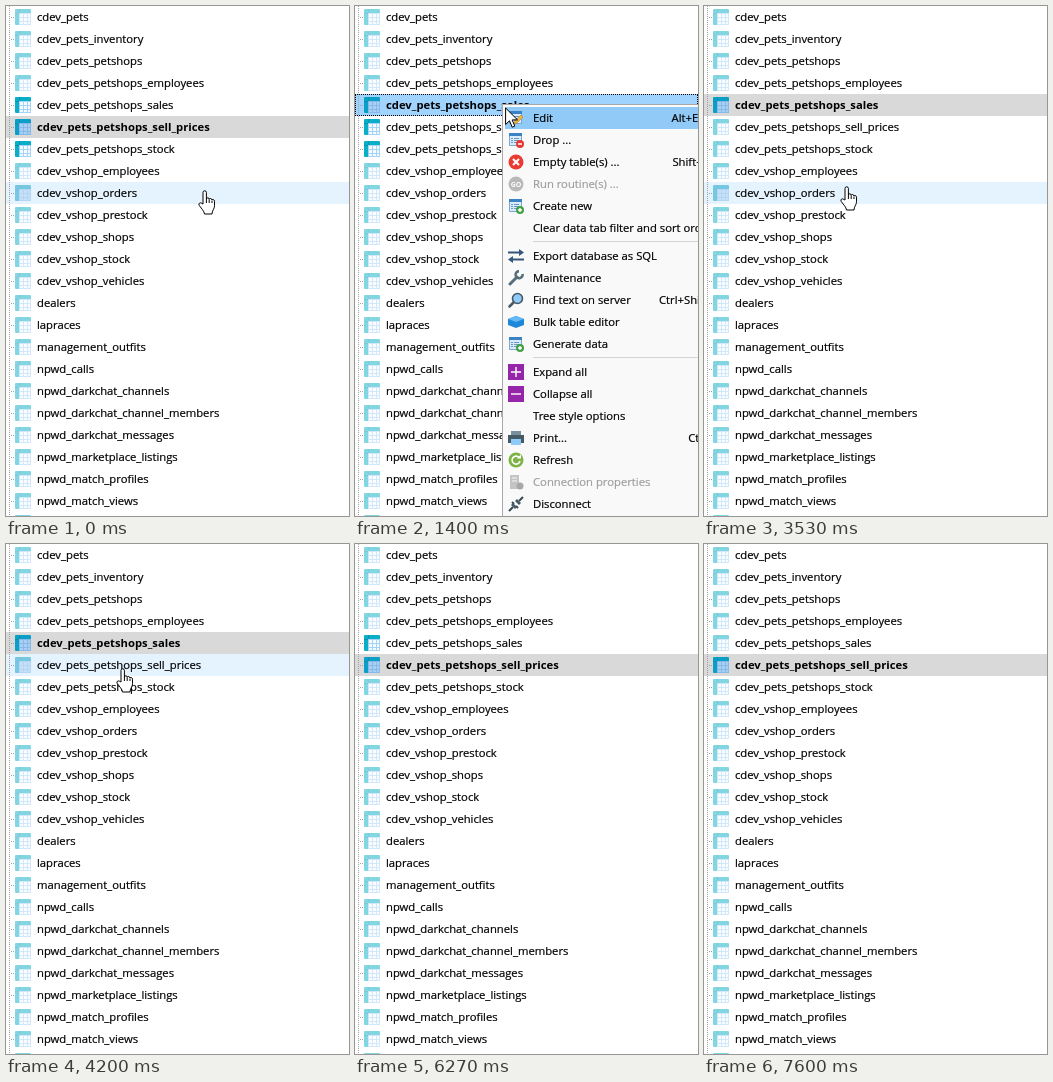
Recreate the animation shown at these times as an HTML page. Size 343 by 510 pixels, loop 8 s.

```html
<!DOCTYPE html>
<html lang="en">
<head>
<meta charset="utf-8">
<title>Table tree</title>
<style>
  html, body { margin: 0; width: 100%; height: 100%; overflow: hidden; background: #fff; }
  body { position: relative; font: 11.27px/22px "Open Sans", "Noto Sans", sans-serif; color: #000; white-space: nowrap; cursor: default; }
  #stage { position: absolute; left: 0; top: 0; width: 343px; height: 510px; overflow: hidden; background: #fff; -webkit-text-stroke: .2px; }
  #tree { position: absolute; left: 0; width: 343px; }
  .row { position: relative; box-sizing: border-box; height: 22px; padding-left: 31px; }
  .row::before { content: ""; position: absolute; left: 3px; top: 0; width: 1px; height: 22px;
    background: repeating-linear-gradient(#a0a0a0 0 1px, transparent 1px 2px); }
  .row::after { content: ""; position: absolute; left: 4px; top: 11px; width: 5px; height: 1px;
    background: repeating-linear-gradient(90deg, transparent 0 1px, #a0a0a0 1px 2px); }
  .row svg { position: absolute; left: 9px; top: 3px; opacity: .5; }
  .row.bright svg { opacity: 1; }
  .row.hot, .row.sel { --cell: #a9cff2; --line: #86b8ea; --head: #0a9fc6; }
  .row.hot { background: #e5f3ff; }
  .row.sel { background: #d9d9d9; font-weight: 700; -webkit-text-stroke: 0; }
  .row.focus { background: #a0d4ff; outline: 1px dotted #000; outline-offset: -1px; }
  .row.focus.hot { background: #cce8ff; }
  #menu { position: absolute; box-sizing: border-box; width: 241px; height: 415px; background: #f9f9f9; border: 1px solid #a8a8a8; }
  .item { position: absolute; left: 2px; right: 1px; height: 22px; }
  .item.hot { background: #91c9f7; }
  .item svg { position: absolute; left: 3px; top: 3px; }
  .item span { position: absolute; left: 28px; }
  .item i { position: absolute; right: 21px; font-style: normal; }
  .item.off { color: #9d9d9d; }
  .sep { position: absolute; left: 30px; right: 0; height: 1px; background: #d4d4d4; }
  #hand, #arrow { position: absolute; left: 0; top: 0; }
</style>
</head>
<body>
<svg width="0" height="0" style="position:absolute">
  <symbol id="table" viewBox="0 0 16 16">
    <rect x="4" y="4" width="12" height="12" style="fill:var(--line,#a3d3f7)"/>
    <path d="M5 5h3v3h-3zM9 5h3v3h-3zM13 5h2v3h-2zM5 9h3v3h-3zM9 9h3v3h-3zM13 9h2v3h-2zM5 13h3v2h-3zM9 13h3v2h-3zM13 13h2v2h-2z" style="fill:var(--cell,#f6fbff)"/>
    <path d="M1 0h14a1 1 0 0 1 1 1v3H4v12H1a1 1 0 0 1-1-1V1a1 1 0 0 1 1-1z" style="fill:var(--head,#08afc6)"/>
    <path d="M0 4.5h4M4.5 0v4" stroke="#0892b0"/>
  </symbol>
  <symbol id="sheet" viewBox="0 0 16 16">
    <path d="M1.5 1.5h12v12h-12z" fill="#d9ebfa" stroke="#7ba7d0"/>
    <path d="M1 1h13v3H1z" fill="#3b82c4"/>
    <path d="M3 6.5h2M6 6.5h5M3 8.5h2M6 8.5h5M3 10.5h2M6 10.5h4" stroke="#6a97c4"/>
  </symbol>
  <symbol id="edit" viewBox="0 0 16 16"><use href="#sheet"/><path d="M6 14l1-3 6-6 2 2-6 6z" fill="#f4b63f" stroke="#b97a18" stroke-width=".6"/></symbol>
  <symbol id="drop" viewBox="0 0 16 16"><use href="#sheet"/><circle cx="12" cy="12" r="4" fill="#e53935"/><path d="M10 12h4" stroke="#fff" stroke-width="1.5"/></symbol>
  <symbol id="add" viewBox="0 0 16 16"><use href="#sheet"/><circle cx="12" cy="12" r="4" fill="#43a047"/><path d="M10 12h4M12 10v4" stroke="#fff" stroke-width="1.4"/></symbol>
  <symbol id="empty" viewBox="0 0 16 16"><circle cx="8" cy="8" r="7.5" fill="#ea3b33"/><path d="M5 5l6 6M11 5l-6 6" stroke="#fff" stroke-width="2"/></symbol>
  <symbol id="go" viewBox="0 0 16 16"><circle cx="8" cy="8" r="7.5" fill="#b9b9b9"/><text x="8" y="10.6" text-anchor="middle" font-size="7" font-weight="700" fill="#fff">GO</text></symbol>
  <symbol id="export" viewBox="0 0 16 16"><path d="M0 4.5h12M4 11.5h12" stroke="#34567a" stroke-width="2"/><path d="M11 1l5 3.5L11 8zM5 8l-5 3.5L5 15z" fill="#34567a"/></symbol>
  <symbol id="wrench" viewBox="0 0 16 16"><path d="M2 14l7-7" stroke="#546e7a" stroke-width="3" stroke-linecap="round"/><path d="M14.5 4A3.5 3.5 0 1 1 11 1.2" fill="none" stroke="#546e7a" stroke-width="2.6"/></symbol>
  <symbol id="find" viewBox="0 0 16 16"><path d="M1.5 14.5l4-4" stroke="#455a64" stroke-width="2.5" stroke-linecap="round"/><circle cx="9.5" cy="6.5" r="5" fill="#90caf9" stroke="#455a64" stroke-width="1.6"/></symbol>
  <symbol id="bulk" viewBox="0 0 16 16"><path d="M0 5l8-3 8 3v6l-8 3-8-3z" fill="#1e88d8"/><path d="M0 5l8-3 8 3-8 3z" fill="#64b8f5"/></symbol>
  <symbol id="plus" viewBox="0 0 16 16"><path d="M0 0h16v16H0z" fill="#9526a9"/><path d="M3 8h10M8 3v10" stroke="#fff" stroke-width="1.4"/></symbol>
  <symbol id="minus" viewBox="0 0 16 16"><path d="M0 0h16v16H0z" fill="#9526a9"/><path d="M3 8h10" stroke="#fff" stroke-width="1.4"/></symbol>
  <symbol id="print" viewBox="0 0 16 16"><path d="M3 1h10v5H3z" fill="#78909c"/><path d="M0 5h16v8H0z" fill="#455a64"/><path d="M3 9h10v6H3z" fill="#90caf9"/></symbol>
  <symbol id="refresh" viewBox="0 0 16 16"><circle cx="8" cy="8" r="7.5" fill="#7cb342"/><path d="M11.5 6A4 4 0 1 0 12 9" fill="none" stroke="#fff" stroke-width="1.6"/><path d="M9 6.5h4v-4z" fill="#fff"/></symbol>
  <symbol id="server" viewBox="0 0 16 16"><path d="M2 1h9v14H2z" fill="#c4c4c4"/><path d="M4 4h5M4 7h5" stroke="#f5f5f5"/><circle cx="12" cy="12" r="3.5" fill="#a8a8a8"/></symbol>
  <symbol id="plug" viewBox="0 0 16 16"><path d="M1 15l4-4M11 5l4-4M6 8l-2-2M10 12l-2-2" stroke="#37474f" stroke-width="2"/><path d="M3 9l4 4 2-2-4-4zM7 5l4 4 2-2-4-4z" fill="#455a64"/></symbol>
</svg>
<div id="stage">
  <div id="tree"></div>
  <div id="menu"></div>
  <svg id="hand" width="18" height="25" viewBox="0 0 18 25">
    <path d="M5 14V2.5a1.7 1.7 0 0 1 3.400 0V9q0-1.300 1.400-1.200T11.200 9.300q.2-1 1.400-.8t1.400 1.500q.3-.8 1.300-.5t1.200 1.700v4.500q0 2-1.200 4t-1.300 4.300H6.500q-.2-2-2-4.300L1.200 15.400q-.9-1.600.4-2.300t2.200.3z" fill="#fff" stroke="#000" stroke-linejoin="round"/>
    <path d="M8.400 9v4M11.200 9.500V13M14 10.500V13" stroke="#000"/>
  </svg>
  <svg id="arrow" width="14" height="22" viewBox="0 0 14 22">
    <path d="M.6 1v16.500l3.900-3.700 2.700 6.400 2.600-1.100-2.700-6.200h5.400z" fill="#fff" stroke="#000"/>
  </svg>
</div>
<script>
const $ = id => document.getElementById(id);
const ROW = 22, LOOP = 8000, TICK = 1000 / 15;

// Rows above the resting view, seen only while the tree scrolls back
const above = `bank_accounts bank_statements bans billing bossmenu cdev_boats cdev_garage cdev_houses
  cdev_items cdev_jobs cdev_keys cdev_lockers cdev_logs cdev_members cdev_orders`.split(/\s+/);
const shown = `cdev_pets cdev_pets_inventory cdev_pets_petshops cdev_pets_petshops_employees
  cdev_pets_petshops_sales cdev_pets_petshops_sell_prices cdev_pets_petshops_stock
  cdev_vshop_employees cdev_vshop_orders cdev_vshop_prestock cdev_vshop_shops cdev_vshop_stock
  cdev_vshop_vehicles dealers lapraces management_outfits npwd_calls npwd_darkchat_channels
  npwd_darkchat_channel_members npwd_darkchat_messages npwd_marketplace_listings
  npwd_match_profiles npwd_match_views npwd_messages`.split(/\s+/);

const icon = id => `<svg width="16" height="16"><use href="#${id}"/></svg>`;
$("tree").innerHTML = above.concat(shown).map(n => `<div class="row">${icon("table")}${n}</div>`).join("");
const rows = [...document.querySelectorAll(".row")];

const entries = [
  ["edit", "Edit", "Alt+Enter"], ["drop", "Drop ..."], ["empty", "Empty table(s) ...", "Shift+Del"],
  ["go", "Run routine(s) ...", "", "off"], ["add", "Create new"], ["", "Clear data tab filter and sort order"], null,
  ["export", "Export database as SQL"], ["wrench", "Maintenance"], ["find", "Find text on server", "Ctrl+Shift+F"],
  ["bulk", "Bulk table editor"], ["add", "Generate data"], null,
  ["plus", "Expand all"], ["minus", "Collapse all"], ["", "Tree style options"], ["print", "Print...", "Ctrl+P"],
  ["refresh", "Refresh", "F5"], ["server", "Connection properties", "", "off"], ["plug", "Disconnect"]
];
let nextY = 2;
$("menu").innerHTML = entries.map(e => {
  const y = nextY;
  nextY += e ? ROW : 6;
  if (!e) return `<div class="sep" style="top:${y + 2}px"></div>`;
  const [id, label, keys = "", cls = ""] = e;
  return `<div class="item ${cls}" style="top:${y}px">${id && icon(id)}<span>${label}</span><i>${keys}</i></div>`;
}).join("");
const items = [...document.querySelectorAll(".item")];

// Pointer path: tick, x, y of the tip
const path = [
  [0, 199, 184], [2, 186, 80], [3, 186, 80], [12, 148, 98], [18, 148, 98], [21, 150, 102],
  [29, 196, 156], [30, 196, 156], [33, 400, 190], [48, 400, 190], [49, 230, 196], [53, 143, 180],
  [61, 115, 122], [63, 117, 124], [68, 117, 124], [73, 125, 125], [83, 125, 125],
  [89, 176, 183], [92, 176, 183], [94, 400, 200], [120, 400, 200]
];
const menus = [
  { x: 147, y: 98, press: 17, open: 18, pick: 30 },
  { x: 125, y: 125, press: 78, open: 78, pick: 92 }
];

const within = (k, a, b) => k >= a && k < b;
const clamp = v => Math.max(0, Math.min(1, v));

function pointer(k) {
  const i = path.findIndex((p, n) => n && k <= p[0]);
  const [a, x0, y0] = path[i - 1], [b, x1, y1] = path[i];
  const u = (k - a) / (b - a);
  return [Math.round(x0 + (x1 - x0) * u), Math.round(y0 + (y1 - y0) * u)];
}

function scrolled(k) {
  const start = within(k, 47, 53) ? 49 : within(k, 107, 114) ? 110 : 0;
  return start ? 15 - 3 * Math.max(0, k - start + 1) : 0;
}

function draw(k) {
  const [x, y] = pointer(k), off = scrolled(k);
  const menu = menus[k < 47 ? 0 : 1];
  const arrow = within(k, menu.press, menu.press + 30);
  const sel = within(k, 10, 69) ? 4 : 5;
  const focus = within(k, 10, 32) || within(k, 69, 93);
  const bright = k < 47 ? [4, 5, 6] : k < 69 ? [4] : k < 106 ? [4, 5] : [5];
  const hot = arrow || x > 342 ? -99 : Math.floor(y / ROW) - off;

  $("tree").style.top = (off - above.length) * ROW + "px";
  $("tree").style.visibility = k === 106 ? "hidden" : "visible";
  rows.forEach((r, n) => {
    const i = n - above.length;
    r.classList.toggle("sel", i === sel);
    r.classList.toggle("focus", i === sel && focus);
    r.classList.toggle("hot", i === hot && (i !== sel || focus));
    r.classList.toggle("bright", bright.includes(i));
  });

  const alpha = k < menu.open ? 0 : Math.min(clamp((k - menu.open + 1) / 3), clamp((menu.pick + 2 - k) / 3));
  const m = $("menu").style;
  m.left = menu.x + "px";
  m.top = menu.y + "px";
  m.opacity = alpha;
  const over = k >= menu.pick ? 2 : Math.floor((y - menu.y - 3) / ROW);
  items.forEach((e, i) => e.classList.toggle("hot", i === over));

  $("hand").style.display = arrow ? "none" : "";
  $("arrow").style.display = arrow ? "" : "none";
  $("hand").style.transform = `translate(${x - 7}px, ${y}px)`;
  $("arrow").style.transform = `translate(${x}px, ${y - 1}px)`;
}

const begin = performance.now();
let last = -1;
function step() {
  const t = (performance.now() - begin) % LOOP;
  const k = Math.floor((t + 4) / TICK) % 120;
  if (k !== last) draw(last = k);
  requestAnimationFrame(step);
}
step();
</script>
</body>
</html>
```
